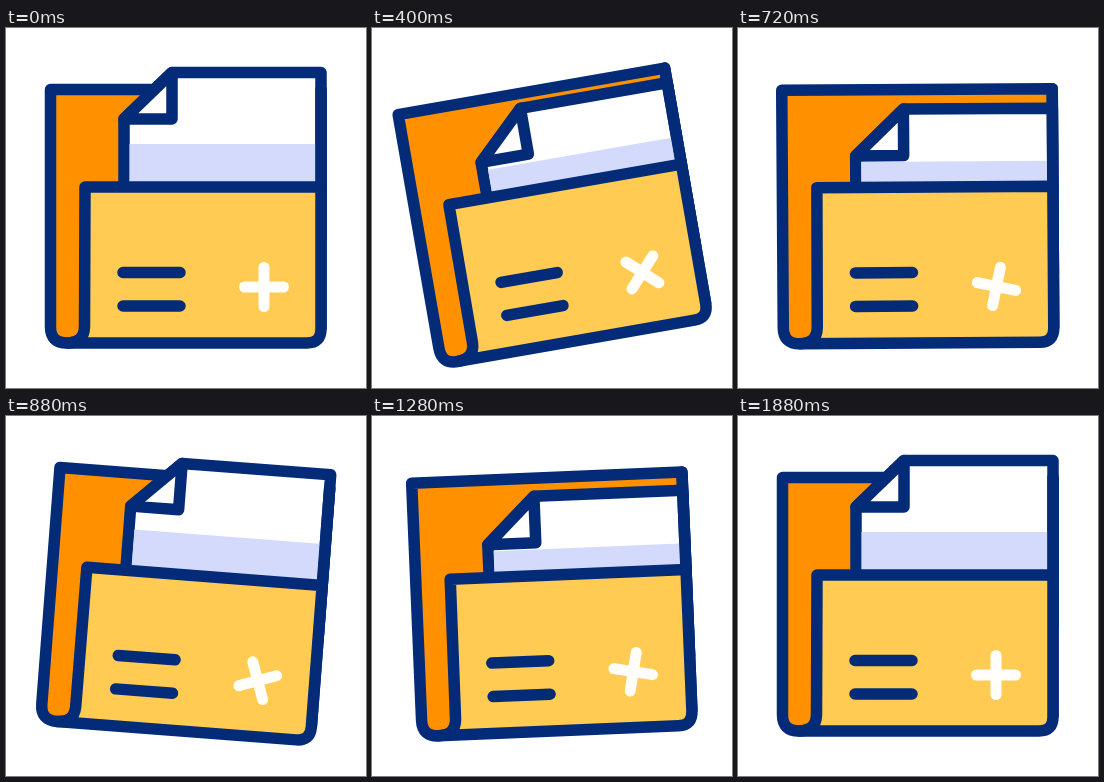
An HTML page that plays this animation: 360x360 px, repeating every 2000 ms.

```html
<!DOCTYPE html>
<html lang="en">
<head>
<meta charset="utf-8">
<title>Folder</title>
<style>
  html, body { margin: 0; width: 100%; height: 100%; overflow: hidden; background: #fff; }
  svg { display: block; width: 100vw; height: 100vh; }
  .ink { stroke: #032b78; stroke-width: 11.5; stroke-linecap: round; stroke-linejoin: round; }
</style>
</head>
<body>
<svg viewBox="0 0 360 360">
  <g id="folder">
    <path class="ink" fill="#ff9100" d="M44.5 61.5H315V300H79V300Q78 315 61 315Q44.5 315 44.5 299Z"/>
    <g id="paper">
      <path class="ink" fill="#fff" d="M118 210V91L166 44.5H315V210Z"/>
    </g>
    <rect id="band" x="123.5" y="116" width="186" height="43" fill="#d4dafc"/>
    <g id="fold">
      <path class="ink" fill="#fff" d="M118 91L166 44.5V91Z"/>
    </g>
    <path class="ink" fill="#ffcb52" d="M79 159H315V301Q315 315 301 315H61Q78 315 78.500 299Z"/>
    <path class="ink" fill="none" d="M315 61.500V159"/>
    <path class="ink" fill="none" d="M117 244.500H174M117 278H174"/>
    <path id="plus" d="M238.500 259H277.500M258 239.500V278.500" fill="none"
          stroke="#fffefa" stroke-width="11" stroke-linecap="round"/>
  </g>
</svg>
<script>
  const LOOP = 2000, STEP = 40;
  const [folder, paper, band, fold, plus] =
    ["folder", "paper", "band", "fold", "plus"].map(id => document.getElementById(id));

  // Keys are [time in ms, value]
  const tilt = [[75, 0], [400, -9.9], [933, 4.8], [1270, -2.4], [1560, 0]];
  const drop = [[75, 0], [615, 49], [933, 0], [1467, 49], [1870, 0]];
  const spin = [[75, 0], [490, 48], [945, -23], [1240, 12], [1500, 0]];

  function at(keys, t) {
    if (t <= keys[0][0]) return keys[0][1];
    for (let i = 1; i < keys.length; i++) {
      const [t0, a] = keys[i - 1], [t1, b] = keys[i];
      if (t < t1) {
        const u = (t - t0) / (t1 - t0);
        return a + (b - a) * u * u * (3 - 2 * u);
      }
    }
    return keys[keys.length - 1][1];
  }

  function draw(t) {
    const y = at(drop, t);
    const bandTop = 116 + y * 0.48;
    folder.setAttribute("transform", `rotate(${at(tilt, t)} 180 180)`);
    paper.setAttribute("transform", `translate(0 ${y})`);
    fold.setAttribute("transform", `translate(0 ${y})`);
    band.setAttribute("y", bandTop);
    band.setAttribute("height", 159 - bandTop);
    plus.setAttribute("transform", `rotate(${at(spin, t)} 258 259)`);
  }

  const start = performance.now();
  function tick() {
    const t = (performance.now() - start) % LOOP;
    draw(Math.floor(t / STEP) * STEP);
    requestAnimationFrame(tick);
  }
  draw(0);
  requestAnimationFrame(tick);
</script>
</body>
</html>
```
